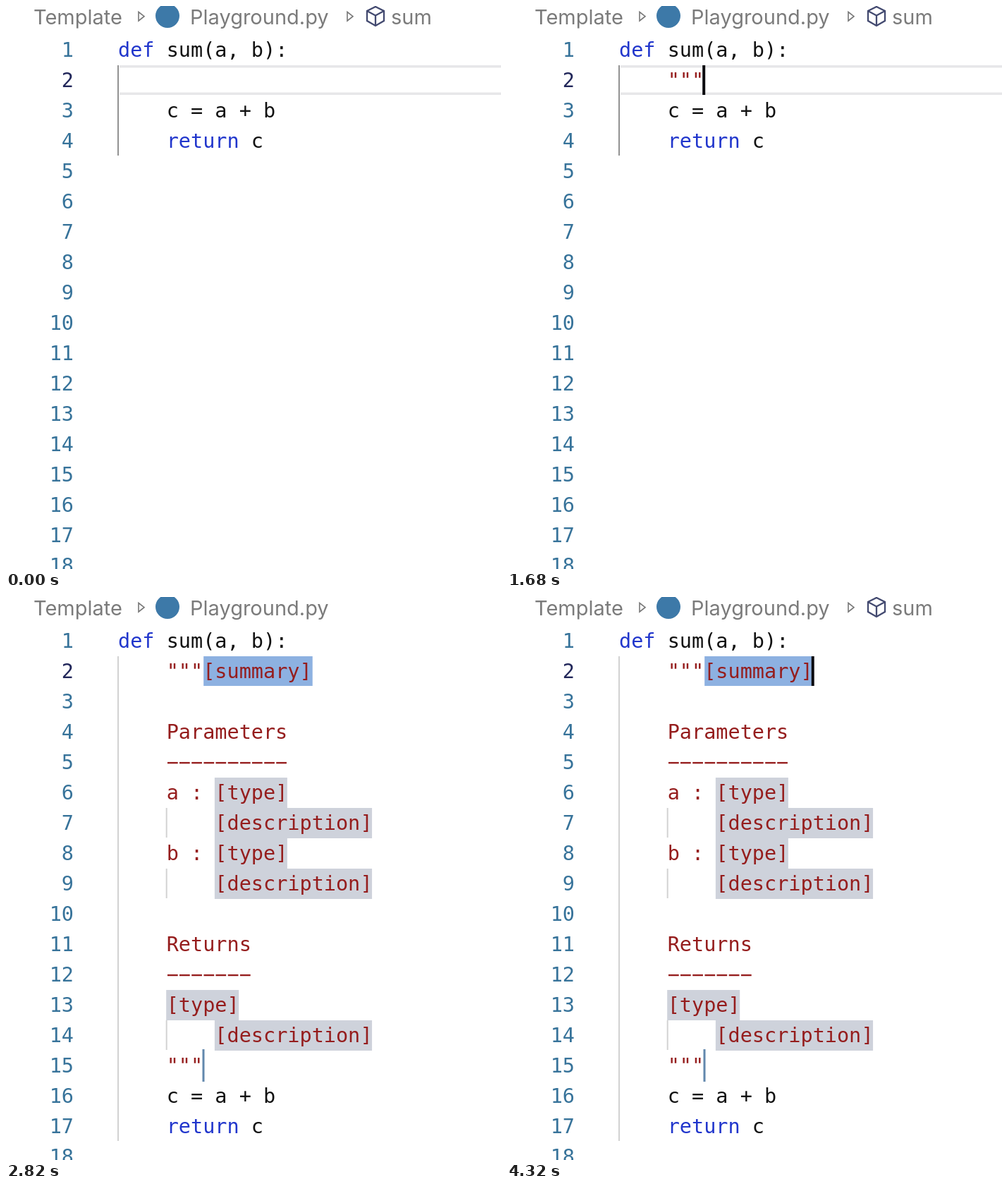
An HTML page with a canvas that plays this animation: 702 px wide and 798 px high, repeating every 4380 ms.

```html
<!DOCTYPE html>
<html>
<head>
<meta charset="utf-8">
<style>
html, body { margin: 0; width: 100%; height: 100%; overflow: hidden; background: #fff; }
canvas { display: block; }
</style>
</head>
<body>
<canvas id="stage" width="702" height="798"></canvas>
<script>
const g = document.getElementById('stage').getContext('2d');
const LOOP = 4380, ROW = 43, CHAR = 17.17, LEFT = 159;
const MONO = '28.5px "DejaVu Sans Mono", monospace';
const SANS = '29px Inter, sans-serif';
const BLACK = '#111', RED = '#951d1d', BLUE = '#2136cc', GRAY = '#7b7b7b';

const header = 'def sum(a, b):';
const body = ['    c = a + b', '    return c'];
const docstring = [
  '    """[summary]', '', '    Parameters', '    ' + '−'.repeat(10),
  '    a : [type]', '        [description]',
  '    b : [type]', '        [description]', '',
  '    Returns', '    ' + '−'.repeat(7),
  '    [type]', '        [description]', '    """'
];

const rowY = row => 41 + ROW * (row - 1);
const colX = col => LEFT + CHAR * col;

function rect(x, y, w, h, color) {
  g.fillStyle = color;
  g.fillRect(x, y, w, h);
}

function text(str, x, y, color) {
  g.fillStyle = color;
  g.fillText(str, x, y);
}

function stroke(path, color, width) {
  g.strokeStyle = color;
  g.lineWidth = width;
  g.stroke(new Path2D(path));
}

function codeLine(str, row, color) {
  for (const m of str.matchAll(/\w+|[^\w\s]+/g)) {
    const keyword = color === BLACK && /^(def|return)$/.test(m[0]);
    text(m[0], colX(m.index), rowY(row) + 31, keyword ? BLUE : color);
  }
}

function docLine(str, row) {
  const field = str.match(/\[\w+\]/);
  if (field) {
    const selected = field[0] === '[summary]';
    rect(colX(field.index) + (selected ? 1 : -0.5), rowY(row), CHAR * field[0].length,
      selected ? 42 : ROW, selected ? '#8db1e1' : '#ced2db');
  }
  codeLine(str, row, RED);
}

function breadcrumb(withSymbol) {
  const arrow = x => stroke(`M${x} 8.5V21L${x + 8} 14.7Z`, '#777', 1.6);
  g.font = SANS;
  text('Template', 39, 26, GRAY);
  arrow(188);
  g.fillStyle = '#3d79a8';
  g.beginPath();
  g.arc(229, 14, 17, 0, 7);
  g.fill();
  text('Playground.py', 261, 26, GRAY);
  if (!withSymbol) return;
  arrow(484);
  stroke('M524 1L536 7V21L524 28L512 21V7ZM512 7L524 13.5L536 7M524 13.5V28', '#434a70', 2.3);
  text('sum', 546, 26, GRAY);
}

function lineNumbers(active) {
  g.textAlign = 'right';
  for (let n = 1; n <= 18; n++) {
    text(n, 96, rowY(n) + 31, n === active ? '#22275a' : '#37739a');
  }
  g.textAlign = 'left';
}

function foldIcons(alpha) {
  g.globalAlpha = alpha;
  for (const row of [1, 6, 8, 13]) {
    const y = rowY(row) + 12;
    stroke(`M122 ${y}h20v20h-20zM127 ${y + 10}h10`, '#dcdcdc', 2);
  }
  g.globalAlpha = 1;
}

function guide(col, row, rows, color) {
  rect(colX(col) - 1, rowY(row), 2, rows * ROW - 1, color);
}

function activeLine(row) {
  rect(161, rowY(row), 541, 3.5, '#e7e7e9');
  rect(161, rowY(row) + 38.5, 541, 3.5, '#e7e7e9');
}

function cursor(row, col) {
  rect(colX(col) - 2, rowY(row), 4, 42, '#0b0b0f');
}

function typing(t) {
  const entered = t >= 2100;
  const quotes = t < 1020 ? 0 : t < 1680 ? 2 : 3;
  const row = entered ? 3 : 2;
  const col = entered || t < 1020 ? 4 : t < 1380 ? 5 : t < 1680 ? 6 : 7;
  activeLine(row);
  guide(0, 2, entered ? 4 : 3, '#929292');
  lineNumbers(row);
  codeLine('    ' + '"'.repeat(quotes), 2, RED);
  body.forEach((s, i) => codeLine(s, row + 1 + i, entered ? RED : BLACK));
  if (t >= 1020 || (t >= 300 && t < 780)) cursor(row, col);
}

function expanded(t) {
  guide(0, 2, 16, '#d2d2d2');
  lineNumbers(2);
  docstring.forEach((s, i) => docLine(s, i + 2));
  for (const row of [7, 9, 14]) guide(4, row, 1, '#d2d2d2');
  rect(278.5, 641, 3, 46, '#6288ad');
  body.forEach((s, i) => codeLine(s, 16 + i, BLACK));
  if ((t - 2160) % 1000 < 500) cursor(2, 16);
  if (t >= 3300 && t < 3720) foldIcons(Math.min(1, (t - 3240) / 120, (3720 - t) / 240));
}

function draw(now) {
  const t = Math.floor((now % LOOP) / 60) * 60;
  rect(0, 0, 702, 798, '#fff');
  breadcrumb(t < 2100 || t >= 3000);
  g.font = MONO;
  codeLine(header, 1, BLACK);
  (t < 2160 ? typing : expanded)(t);
}

const start = performance.now();
function tick() {
  draw(performance.now() - start);
  requestAnimationFrame(tick);
}
tick();
</script>
</body>
</html>
```
